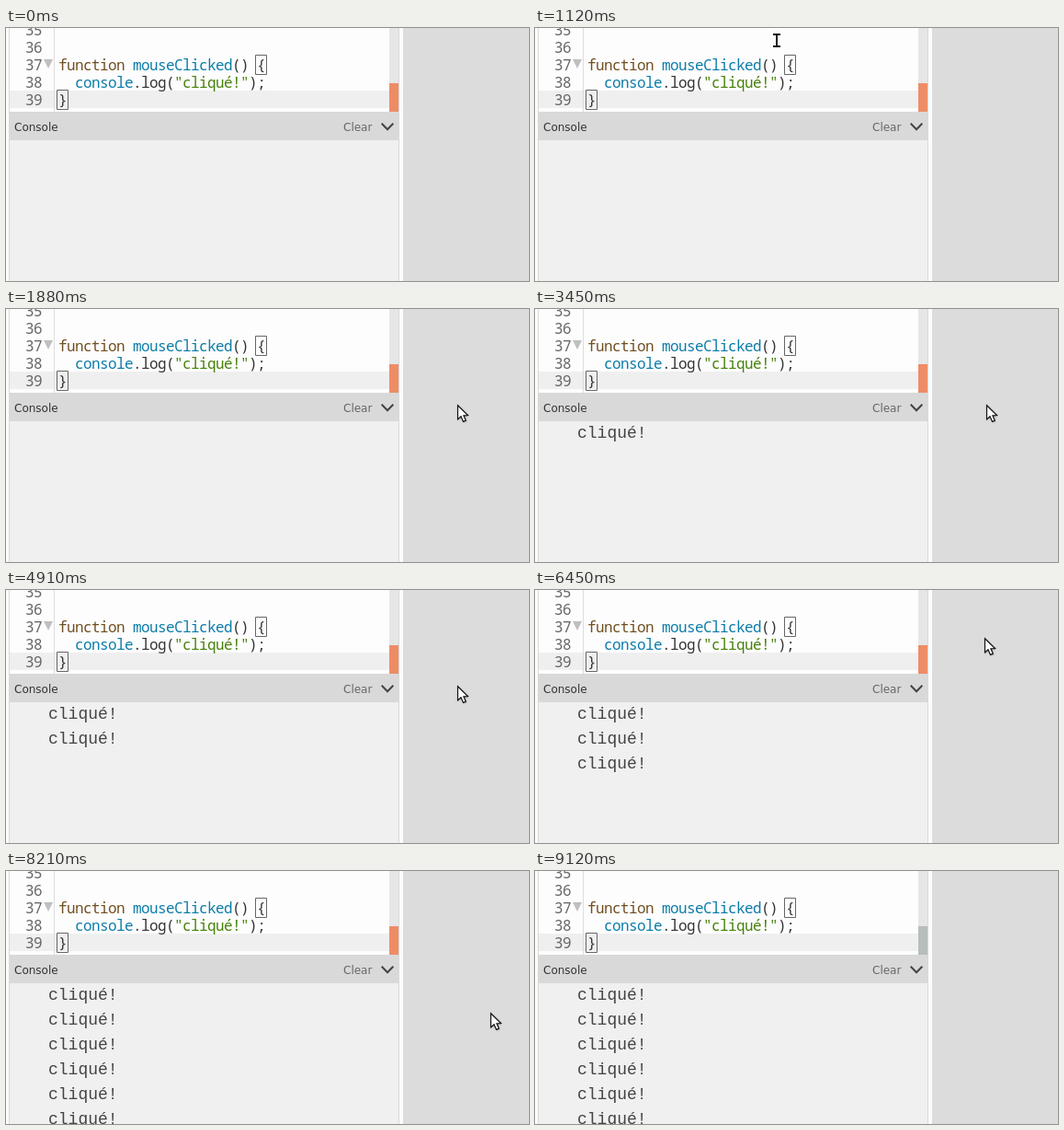
Recreate the animation shown at these times as an HTML page with a canvas. Size 569x275 px, loop 9270 ms.

```html
<!DOCTYPE html>
<html lang="fr">
<head>
<meta charset="utf-8">
<title>Console</title>
<style>
  html, body { margin: 0; width: 100%; height: 100%; overflow: hidden; background: #fcfcfc; }
  canvas { display: block; }
</style>
</head>
<body>
<canvas id="stage" width="569" height="275"></canvas>
<script>
const ctx = document.getElementById("stage").getContext("2d");
const LOOP = 9270;
const CODE = '16px "Noto Sans Mono", monospace';
const LABEL = '12px "DejaVu Sans", sans-serif';
const OUTPUT = '18px "Liberation Mono", monospace';
const DARK = "#333333", BLUE = "#0b7ca9", BROWN = "#704f21", GREEN = "#47820a";

const clicks = [3450, 4910, 5970, 6820, 7390, 8180];

// Pointer stops: time, x, y and the easing used to get there.
const linear = k => k;
const easeIn = k => k * (0.6 + 0.4 * k);
const easeOut = k => 1 - (1 - k) ** 2;
const smooth = k => k * k * (3 - 2 * k);
const path = [
  [970, 240, 2, linear],
  [1480, 347, 52, easeIn],
  [1880, 491, 104, easeOut],
  [6180, 491, 104, linear],
  [6450, 489, 52, smooth],
  [6820, 489, 52, linear],
  [6910, 520, 57, easeOut],
  [7390, 520, 57, linear],
  [7520, 533, 115, easeIn],
  [7790, 528, 165, easeOut],
  [8180, 528, 165, linear],
  [8520, 512, -22, easeIn]
];

function pointerAt(time) {
  const next = path.findIndex(stop => stop[0] > time);
  if (next < 1) return null;
  const [t0, x0, y0] = path[next - 1];
  const [t1, x1, y1, ease] = path[next];
  const k = ease((time - t0) / (t1 - t0));
  return [Math.round(x0 + (x1 - x0) * k), Math.round(y0 + (y1 - y0) * k)];
}

function rect(color, x, y, w, h) {
  ctx.fillStyle = color;
  ctx.fillRect(x, y, w, h);
}

function text(value, x, y, color, font, tracking = 0) {
  ctx.font = font;
  ctx.letterSpacing = tracking + "px";
  ctx.fillStyle = color;
  ctx.fillText(value, x, y);
}

function codeText(value, x, y, color) {
  text(value, x, y, color, CODE, -0.6);
}

function codeLine(column, y, ...parts) {
  for (const [value, color] of parts) {
    codeText(value, 57 + column * 9, y, color);
    column += value.length;
  }
}

function trace(points, closed) {
  ctx.beginPath();
  points.forEach(([x, y]) => ctx.lineTo(x, y));
  if (closed) ctx.closePath();
}

function stroke(color, width) {
  ctx.strokeStyle = color;
  ctx.lineWidth = width;
  ctx.stroke();
}

function bracketBox(x, y) {
  ctx.beginPath();
  ctx.rect(x, y, 12, 21);
  stroke("#666666", 1);
}

function drawEditor(focused) {
  rect("#fdfdfd", 4, 0, 413, 91);
  rect("#efefef", 4, 68, 413, 19);
  rect("#dddddd", 52, 0, 1, 91);
  rect("#e6e6e6", 417, 0, 10, 91);
  rect(focused ? "#ee8c66" : "#b7bdbb", 417, 60, 10, 31);

  for (let n = 35; n <= 39; n++) codeText(String(n), 21, 8 + (n - 35) * 19, "#666666");
  trace([[41, 34], [51, 34], [46, 44]], true);
  ctx.fillStyle = "#bfbfbf";
  ctx.fill();

  codeLine(0, 46, ["function", BROWN], [" ", DARK], ["mouseClicked", BLUE], ["() {", DARK]);
  codeLine(2, 65, ["console", BLUE], [".log(", DARK], ['"cliqué!"', GREEN], [");", DARK]);
  codeLine(0, 84, ["}", DARK]);
  bracketBox(271.5, 29.5);
  bracketBox(55.5, 67.5);
}

function drawConsole(time) {
  rect("#f0f0f0", 4, 122, 423, 153);
  rect("#d9d9d9", 4, 91, 424, 31);
  text("Console", 9, 112, DARK, LABEL);
  text("Clear", 367, 112, "#666666", LABEL);
  trace([[408.7, 103.7], [415, 110.2], [421.3, 103.7]]);
  stroke("#444444", 2);
  clicks.forEach((at, row) => {
    if (time >= at) text("cliqué!", 46, 140 + row * 27, "#444444", OUTPUT);
  });
}

function drawIBeam() {
  ctx.beginPath();
  for (const y of [-6, 7]) {
    ctx.moveTo(-3, y);
    ctx.lineTo(3, y);
  }
  ctx.moveTo(0, -6);
  ctx.lineTo(0, 7);
  ctx.lineCap = "square";
  stroke("#ffffff", 4);
  stroke("#111111", 2);
  ctx.lineCap = "butt";
}

function drawArrow() {
  trace([[0.5, 0.7], [0.5, 16], [4, 12.8], [6.5, 18.4], [9.3, 17.2], [6.9, 11.8], [11.5, 11.5]], true);
  ctx.save();
  ctx.shadowColor = "rgba(0, 0, 0, 0.3)";
  ctx.shadowBlur = 2;
  ctx.shadowOffsetX = ctx.shadowOffsetY = 1;
  ctx.fillStyle = "#ffffff";
  ctx.fill();
  ctx.restore();
  stroke("#111111", 1.2);
}

function drawPointer(time) {
  const spot = pointerAt(time);
  if (!spot) return;
  ctx.save();
  ctx.translate(...spot);
  if (spot[0] < 417) drawIBeam();
  else drawArrow();
  ctx.restore();
}

function draw(time) {
  rect("#fcfcfc", 0, 0, 569, 275);
  rect("#d9d9d9", 3, 0, 1, 275);
  rect("#d9d9d9", 427, 0, 1, 275);
  rect("#dcdcdc", 432, 0, 137, 275);
  drawEditor(time < 9120);
  drawConsole(time);
  drawPointer(time);
}

const start = performance.now();
function tick() {
  draw((performance.now() - start) % LOOP);
  requestAnimationFrame(tick);
}
tick();
</script>
</body>
</html>
```
